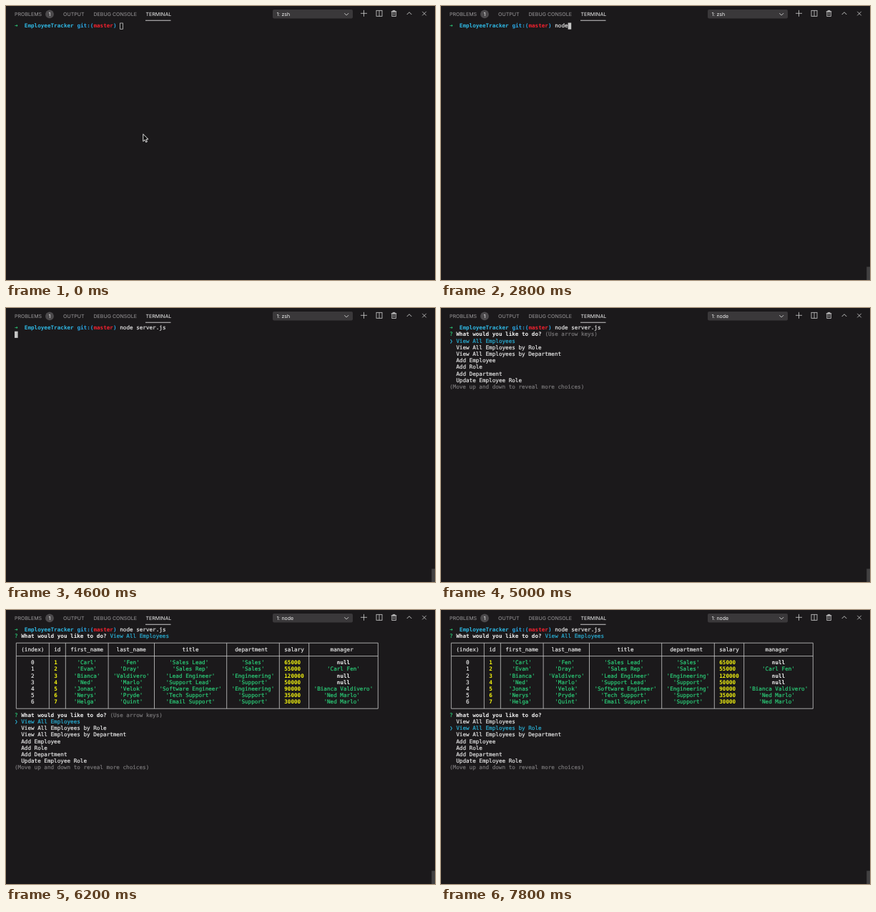
An HTML page with a canvas for the animation above (8 s loop, 600 by 384 pixels).

```html
<!DOCTYPE html>
<html lang="en">
<head>
<meta charset="utf-8">
<title>Terminal session</title>
<style>
html, body { margin: 0; width: 100%; height: 100%; overflow: hidden; background: #1b191b; }
canvas { display: block; }
</style>
</head>
<body>
<canvas id="stage" width="600" height="384"></canvas>
<script>
const ctx = document.getElementById('stage').getContext('2d');
const LOOP = 8000;
const LEFT = 12, TOP = 23.2, COL = 4.6, ROW = 9.2;
const MONO = '7.64px "DejaVu Sans Mono", monospace';
const UI = '7.05px Inter, sans-serif';
const C = {
  bg: '#1b191b', text: '#e8e8e8', dim: '#7a787a', tab: '#9c9a9c', white: '#f4f4f4',
  green: '#2cd07a', red: '#f2222f', yellow: '#f5f510', cyan: '#2ab0d6',
  dir: '#2fb8e4', git: '#2aa4e0', block: '#c6c6c6', line: '#cccccc',
  field: '#3a383a', badge: '#4c4a4c', thumb: '#414041', icon: '#d0d0d0'
};

// Moments at which the session moves on, in ms.
const AT = { focus: 800, beam: 1000, beamOff: 1200, run: 4600, menu: 4800, answer: 6000, table: 6200, down: 7600 };
const CMD = 'node server.js ';
const KEYS = { 2000: 'n', 2200: 'no', 2800: 'node', 3200: 'node s', 3400: 'node se', 4000: CMD };
const POINTER = { 0: [191.8, 179.5], 200: [239.4, 73.4], 400: [207.6, 21.6], 600: [199.6, 31.9] };

const CHOICES = ['View All Employees', 'View All Employees by Role', 'View All Employees by Department',
  'Add Employee', 'Add Role', 'Add Department', 'Update Employee Role'];

const HEAD = ['(index)', 'id', 'first_name', 'last_name', 'title', 'department', 'salary', 'manager'];
const STAFF = `Carl,Fen,Sales Lead,Sales,65000,null
Evan,Dray,Sales Rep,Sales,55000,Carl Fen
Bianca,Valdivero,Lead Engineer,Engineering,120000,null
Ned,Marlo,Support Lead,Support,50000,null
Jonas,Velok,Software Engineer,Engineering,90000,Bianca Valdivero
Nerys,Pryde,Tech Support,Support,35000,Ned Marlo
Helga,Quint,Email Support,Support,30000,Ned Marlo`
  .split('\n').map((line, i) => [i, i + 1, ...line.split(',')].map(format));

function format(v, i) {
  if (i === 0) return { str: String(v), color: C.text };
  if (v === 'null') return { str: v, color: C.white, bold: true };
  if (!isNaN(v)) return { str: String(v), color: C.yellow, bold: true };
  return { str: `'${v}'`, color: C.green };
}

const widths = HEAD.map((h, i) => 2 + Math.max(h.length, ...STAFF.map(p => p[i].str.length)));
const edges = widths.reduce((e, w) => [...e, e[e.length - 1] + w + 1], [0]);

const latest = (steps, t, none) =>
  Object.keys(steps).reduce((found, at) => +at <= t ? steps[at] : found, none);
const colX = c => LEFT + c * COL;
const rowY = r => TOP + r * ROW;

function put(col, row, str, color, bold) {
  const x = colX(col), y = rowY(row) + 7;
  ctx.font = (bold ? 'bold ' : '') + MONO;
  ctx.fillStyle = ctx.strokeStyle = color;
  ctx.fillText(str, x, y);
  if (!bold) {
    ctx.lineWidth = 0.18;
    ctx.strokeText(str, x, y);
  }
}

function label(x, str, color, align = 'left') {
  ctx.font = UI;
  ctx.fillStyle = color;
  ctx.textAlign = align;
  ctx.fillText(str, x, 14);
  ctx.textAlign = 'left';
}

function box(x, y, w, h, color) {
  ctx.fillStyle = color;
  ctx.fillRect(x, y, w, h);
}

function frame(x, y, w, h, color = C.icon, width = 0.8) {
  ctx.strokeStyle = color;
  ctx.lineWidth = width;
  ctx.strokeRect(x, y, w, h);
}

function line(x0, y0, x1, y1, color = C.icon, width = 0.8) {
  ctx.strokeStyle = color;
  ctx.lineWidth = width;
  ctx.beginPath();
  ctx.moveTo(x0, y0);
  ctx.lineTo(x1, y1);
  ctx.stroke();
}

// Two equal arms meeting at (x, y); dir is +1 for up, -1 for down.
function chevron(x, y, size, dir) {
  for (const side of [-1, 1]) line(x, y, x + side * size, y + dir * size, C.icon, 0.9);
}

function cross(x, y, r, turn) {
  for (const a of [turn, turn + Math.PI / 2]) {
    const dx = r * Math.cos(a), dy = r * Math.sin(a);
    line(x - dx, y - dy, x + dx, y + dy);
  }
}

function block(col, row) {
  box(colX(col), rowY(row) + 0.3, COL, ROW, C.block);
}

function tabs(shell) {
  label(12, 'PROBLEMS', C.tab);
  ctx.fillStyle = C.badge;
  ctx.beginPath();
  ctx.arc(61, 11.4, 5.9, 0, 7);
  ctx.fill();
  label(61, '1', C.white, 'center');
  label(80, 'OUTPUT', C.tab);
  label(122.5, 'DEBUG CONSOLE', C.tab);
  label(195.5, 'TERMINAL', C.white);
  box(195, 19.8, 35.5, 0.8, C.white);

  ctx.fillStyle = C.field;
  ctx.beginPath();
  ctx.roundRect(373, 5, 112, 12.4, 2);
  ctx.fill();
  label(378.5, shell, C.white);
  chevron(476.2, 13, 2.9, -1);

  cross(500.5, 10.3, 4.5, 0);
  frame(518, 6.3, 8, 8);
  line(522, 6.3, 522, 14.3);
  line(538.7, 7.8, 546.3, 7.8);
  frame(541.2, 6.3, 2.6, 1.5);
  frame(539.8, 7.8, 5.5, 6.6);
  for (const x of [541.6, 543.4]) line(x, 9.2, x, 13.2, C.icon, 0.6);
  chevron(564, 8.7, 3.3, 1);
  cross(585, 10.6, 3.9, Math.PI / 4);
}

function prompt(cmd) {
  put(0, 0, '➜', C.green, true);
  put(3, 0, 'EmployeeTracker', C.dir, true);
  put(19, 0, 'git:(', C.git, true);
  put(24, 0, 'master', C.red, true);
  put(30, 0, ')', C.git, true);
  put(32, 0, cmd, C.text);
}

function question(row, tail, color) {
  put(0, row, '?', C.green);
  put(2, row, 'What would you like to do?', C.white, true);
  put(29, row, tail, color);
}

function menu(row, picked) {
  question(row, picked ? '' : '(Use arrow keys)', C.dim);
  CHOICES.forEach((name, i) => {
    const on = i === picked;
    if (on) put(0, row + 1 + i, '❯', C.cyan, true);
    put(2, row + 1 + i, name, on ? C.cyan : C.text);
  });
  put(0, row + 1 + CHOICES.length, '(Move up and down to reveal more choices)', C.dim);
}

function cell(i, row, { str, color, bold }) {
  const pad = Math.floor((widths[i] - str.length) / 2);
  put(edges[i] + 1 + pad, row, str, color, bold);
}

function table(row) {
  const last = row + 3 + STAFF.length;
  const mid = r => rowY(r + 0.5);
  const xs = edges.map(e => colX(e + 0.5));
  for (const r of [row, row + 2, last]) line(xs[0], mid(r), xs[xs.length - 1], mid(r), C.line);
  for (const x of xs) line(x, mid(row), x, mid(last), C.line);
  HEAD.forEach((str, i) => cell(i, row + 1, { str, color: C.text }));
  STAFF.forEach((person, n) => person.forEach((item, i) => cell(i, row + 3 + n, item)));
}

const ARROW = new Path2D('M0 0V10.2L2.4 8L3.9 11.4L5.6 10.7L4.1 7.4L7.2 7.2Z');

function mouse(t) {
  if (t < AT.focus) {
    ctx.save();
    ctx.translate(...latest(POINTER, t));
    ctx.fillStyle = '#000';
    ctx.fill(ARROW);
    ctx.strokeStyle = '#fff';
    ctx.lineWidth = 0.9;
    ctx.stroke(ARROW);
    ctx.restore();
  } else if (t >= AT.beam && t < AT.beamOff) {
    line(201.5, 29, 201.5, 38.2);
    for (const y of [28.8, 38.4]) line(199.6, y, 203.4, y);
  }
}

function draw(t) {
  box(0, 0, 600, 384, C.bg);
  ctx.textRendering = 'geometricPrecision';
  tabs(t < AT.menu ? '1: zsh' : '1: node');

  const cmd = latest(KEYS, t, '');
  prompt(cmd);
  if (t >= AT.focus) box(595.3, 365.5, 4.7, 18.5, C.thumb);

  if (t < AT.focus) {
    frame(colX(32) + 0.4, rowY(0) + 0.8, COL - 0.8, ROW - 0.9, C.block);
  } else if (t < AT.run) {
    block(32 + cmd.length, 0);
  } else if (t < AT.menu) {
    block(0, 1);
  } else if (t < AT.answer) {
    menu(1, 0);
  } else {
    question(1, CHOICES[0], C.cyan);
    if (t < AT.table) {
      block(0, 2);
    } else {
      table(2);
      menu(13, t < AT.down ? 0 : 1);
    }
  }
  mouse(t);
}

const start = performance.now();
function tick() {
  draw((performance.now() - start) % LOOP);
  requestAnimationFrame(tick);
}
tick();
</script>
</body>
</html>
```
